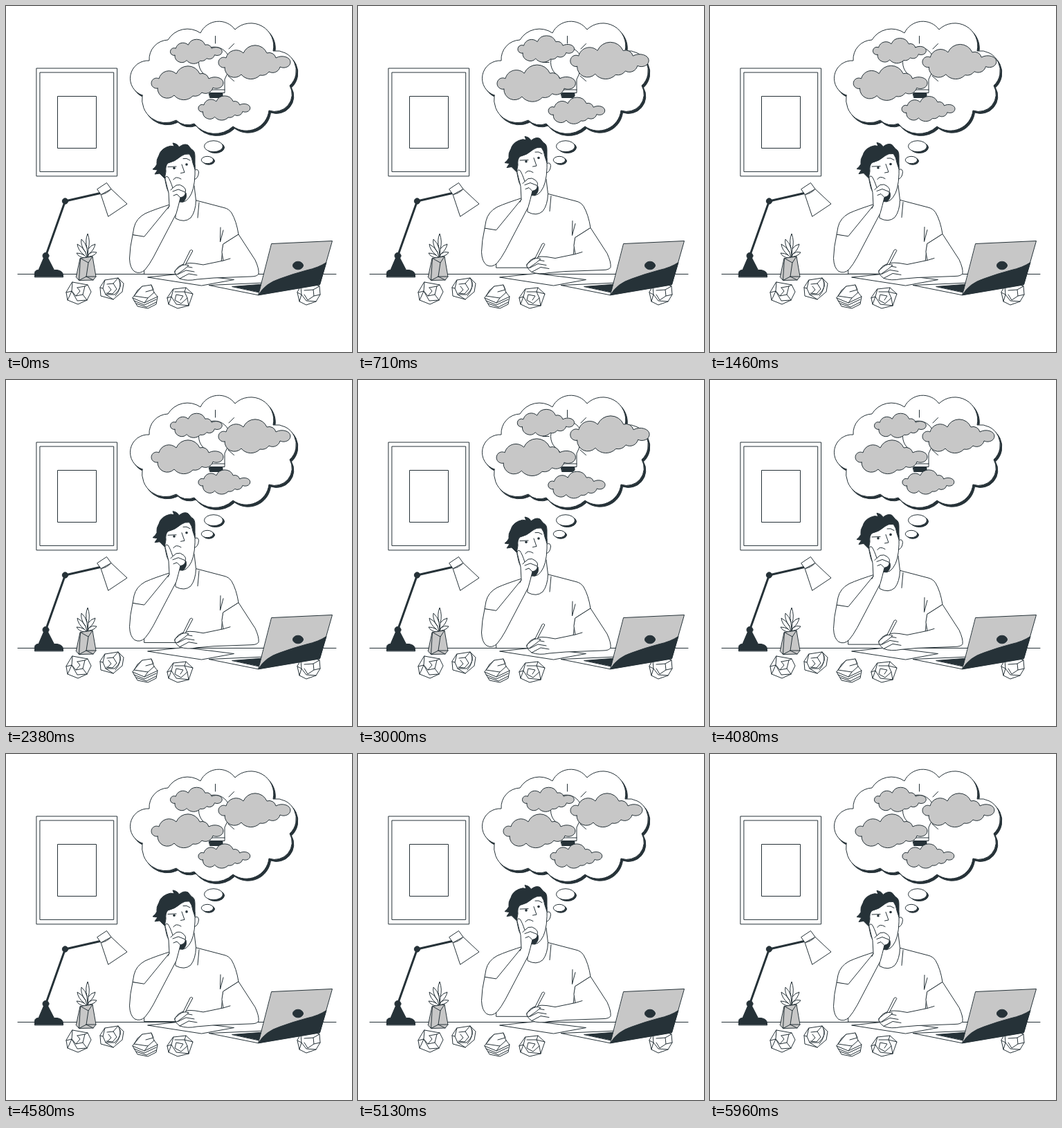
An HTML page that plays this animation: 500 by 500 pixels, repeating every 6000 ms.

```html
<!DOCTYPE html>
<html lang="en">
<head>
<meta charset="utf-8">
<title>Thinking at the desk</title>
<style>
  /* Registered properties keep the strokes sharp: each step is repainted, not resampled. */
  @property --zoom { syntax: "<number>"; inherits: false; initial-value: 1; }
  @property --lift { syntax: "<length>"; inherits: false; initial-value: 0px; }

  html, body { margin: 0; width: 100%; height: 100%; overflow: hidden; background: #fff; }
  svg { display: block; width: 100vw; height: 100vh; }
  .art { fill: #fff; stroke: #263238; stroke-width: 1; stroke-linejoin: round; stroke-linecap: round; }
  .line { fill: none; }
  .dark { fill: #263238; }
  .grey { fill: #c7c7c7; }
  .flat { stroke: none; }
  .thick { fill: none; stroke-width: 3; }
  .cloud { vector-effect: non-scaling-stroke; }
  .clouds {
    transform-origin: 309.5px 106.5px;
    transform: scale(var(--zoom));
    animation: heartbeat 6s linear infinite;
  }
  .man { transform: translateY(var(--lift)); animation: float 1.5s linear infinite; }
  @keyframes heartbeat {
    0%, 30%, 40%, 60%, 100% { --zoom: 1; }
    10%, 50% { --zoom: 1.1; }
  }
  @keyframes float {
    0%, 100% { --lift: 0px; }
    50% { --lift: -10px; }
  }
</style>
</head>
<body>
<svg viewBox="0 0 500 500">
  <defs>
    <path id="bubble" d="M197 129A25.7 25.7 0 0 1 207 79A28 28 0 0 1 234 49A33 33 0 0 1 281 39A29.3 29.3 0 0 1 331 34A33 33 0 0 1 386 65A29 29 0 0 1 410 115A25 25 0 0 1 380 151A33 33 0 0 1 328 174A38 38 0 0 1 272 170A24 24 0 0 1 246 165A34 34 0 0 1 197 129Z"/>
    <path id="cloud" class="cloud" d="M219 119A7.5 7.5 0 1 1 221 105A15 15 0 0 1 246 98A18.5 18.5 0 0 1 280 98A10 10 0 0 1 293 105C302 100 314 104 314 111C314 118 305 121 299 118A11 11 0 0 1 283 125A13 13 0 0 1 270 130A18 18 0 0 1 243 129A14 14 0 0 1 219 119Z"/>
  </defs>

  <g class="art">
    <!-- picture frame -->
    <rect x="44.3" y="90" width="116.3" height="155.9"/>
    <rect x="49.3" y="96" width="106.4" height="143.4"/>
    <rect x="74.9" y="130.5" width="55.6" height="75"/>

    <!-- thought bubble -->
    <use href="#bubble" class="dark" x="2.5" y="3"/>
    <use href="#bubble"/>
    <ellipse class="dark" cx="302.5" cy="204.5" rx="13" ry="8"/>
    <ellipse cx="300" cy="202.7" rx="13.5" ry="8"/>
    <ellipse class="dark" cx="293" cy="224" rx="8.5" ry="5.2"/>
    <ellipse cx="291" cy="222.5" rx="8.7" ry="5.2"/>

    <!-- bulb -->
    <path d="M295 113Q295 106 288 100A22.5 22.5 0 1 1 321 92Q320 99 316 106V125.5H295Z"/>
    <path class="line" d="M295 121H316M302.5 43.5V54M322 62L329.5 54.5M321 101L329.5 108.5M267 81.5H276"/>
    <path class="dark" d="M293.5 126.5H313V130.5L310 132.5H295Z"/>

    <g class="clouds grey">
      <use href="#cloud"/>
      <use href="#cloud" x="97" y="-30"/>
      <use href="#cloud" transform="translate(86.2 -14.3) scale(.72)"/>
      <use href="#cloud" transform="translate(126.7 67.4) scale(.72)"/>
    </g>

    <!-- table -->
    <path class="line" d="M17 387.5H477"/>

    <!-- lamp -->
    <path class="thick" d="M57.5 361L85.5 282L136 270.5"/>
    <path class="dark" d="M41.5 391.5V385.5Q42 381.5 47 381.5L54.5 364H60.5L69.5 381.5H74Q82.5 383 82.5 389V391.5Z"/>
    <circle class="dark" cx="57.5" cy="361" r="4.5"/>
    <circle class="dark" cx="85.5" cy="282" r="4.2"/>
    <path d="M132 264.5L145.5 255.5L152 264.5L137.5 272.5Z"/>
    <path d="M137.5 272.5Q146 271 152 264.5L175 286L148 304Z"/>

    <!-- plant -->
    <path d="M113 364Q105 363 102 357Q108 357 113 360Q104 353 103 344Q111 348 115 356Q107 345 109 337Q115 342 117 350Q114 338 118 329Q122 340 119 351Q122 346 129 344Q127 353 120 358Q125 354 131 356Q128 361 121 362Z"/>
    <path class="line" d="M113 360L116 363M115 356L117 363M117 350L118 362M119 351L118 362M120 358L118 363"/>
    <path class="grey" d="M107.5 364.5L125 362L130 391L126 396L105.5 396.5L101.5 392Z"/>
    <path class="line" d="M107.5 364.5L119 371L125 362M119 371L116 391L105.5 396.5M116 391L126 396M107.5 364.5L105.5 396.5M116 391L130 391"/>

    <!-- crumpled paper -->
    <path d="M96 399L118 403L123 413L117 425L104 431L89 425L87 414Z"/>
    <path class="line" d="M96 399L95 412L103 426L117 425M87 414L95 412L89 425M103 407L114 405L118 403M103 407L107 412L101 419L95 412M114 405L111 417L101 419M111 417L117 425"/>
    <path d="M143 396L162 393L170 401L168 413L155 424L137 419L136 407Z"/>
    <path class="line" d="M143 396L140 408L144 417L155 424M136 407L140 408M146 402L155 401L160 409L154 416L145 415M162 393Q171 405 157 417L144 417M164 397Q168 407 158 419M148 405L152 410L147 415M155 401L162 393"/>
    <path d="M197 405L210 403L214 414L219 420L217 431L205 437L190 434L183 422Z"/>
    <path class="line" d="M190 411L197 405M190 411L185 419L205 422L214 414M183 422L200 429L219 420M185 426L200 432L217 424M188 430L203 435L217 428M205 422L200 429M210 403L213 410L202 413"/>
    <path d="M242 409L260 407L270 416L264 433L248 437L235 431L233 422Z"/>
    <path class="line" d="M242 409L239 420L246 431L264 433M233 422L239 420L235 431M244 413L258 413L262 422L253 430L244 425L246 417L256 419L252 425M260 407L258 413L270 416M262 422L264 433"/>
    <path d="M426 405L443 401L453 405L454 417L448 427L434 432L424 427L421 414Z"/>
    <path class="line" d="M426 405L427 417L434 426L448 427M421 414L427 417L424 427M431 417L436 425L445 419L444 410L431 411M444 410L453 405M445 419L454 417"/>

    <path d="M205 392L257 386.5L329.5 395.5L283 404Z"/>

    <g class="man">
      <!-- torso -->
      <path d="M200 387.7H309L314 344L336 330Q333 311 326 299Q322 293 315 291.5L275 281L243 285Q214 294 201 300Q188 307 185 320L183 331L200 334Z"/>
      <path class="line" d="M310 320L309.5 341L314 324M279 284L277 306"/>

      <!-- neck and head -->
      <path d="M245 280V307Q258 314 267 306Q274 297 274.5 281L272 260Z"/>
      <path d="M271 239Q277 233 278.5 240Q278 250 271 251"/>
      <path d="M228 232L230 252Q233 277 250 283Q261 286 268 271Q274 258 273 230L266 212L238 219Z"/>
      <path class="dark" d="M229 249L222 242L215 243L219 237L212 236Q216 233 218 229Q217 222 221 216Q223 208 232 204Q238 201 243 203L241 198Q248 199 250 204Q257 198 263 201L268 207Q273 209 273 217V236L270 227Q269 219 265 214Q258 213 253 217Q244 225 234 227Q230 231 231 239Z"/>
      <path class="line" d="M234 232.5L246 232M256 220.5Q261 219 266 223"/>
      <circle class="dark flat" cx="243" cy="234.3" r="1.8"/>
      <circle class="dark flat" cx="261" cy="229" r="1.8"/>
      <path class="line" d="M254 229L258 240.5L252.5 241.5M242 251Q245 245 253 250"/>
      <path class="dark" d="M249 274L260 270Q262 278 256 283L249 282Z"/>

      <!-- arm under the chin -->
      <path d="M183 331Q179 348 178.5 365Q179 379 186 384Q194 388 201 381Q207 374 213 363L246 300L249 289L252 277Q260 275 259 269Q261 265 256 261Q252 257 246 259L241 263Q237 251 234 247Q230 245 230 250L235 270L236 289L200 333Z"/>
      <path class="line" d="M241 263L238 266M259 269L249 265L241 268M252 277L247 272L242 274M236 289L234 293"/>

      <!-- writing arm -->
      <path d="M314 344L336 330L360 367Q366 380 365 387Q363 391 354 391L300 393L276 395Q262 398 251 394Q243 388 244 383L249 377Q258 370 273 372L285 374L314 368L312 356Z"/>
      <path class="line" d="M248 388L260 382L272 384M251 394L264 387L276 389M244 383L258 376L269 378M314 368L324 365"/>
      <path d="M266.5 353Q269 351.5 269.8 354L258 376L254 382L255.5 375Z"/>
      <path d="M251 377Q257 372 264 375L257 381L247 388Q242 387 245 382Z"/>
    </g>

    <!-- laptop -->
    <path d="M293.500 403.5L374 400L365 417.5Z"/>
    <path class="dark" d="M327 405.5L372 402L365 413.5Z"/>
    <path class="grey" d="M384 343.5L471.5 339.5L453.5 402.5L365 417.5Z"/>
    <path class="dark" d="M365 417.5Q374 401 396 394Q415 387 434 382Q452 378 463 370.5L453.500 402.5Z"/>
    <ellipse class="dark" cx="422" cy="375" rx="7.5" ry="5.8"/>
  </g>
</svg>
</body>
</html>
```
